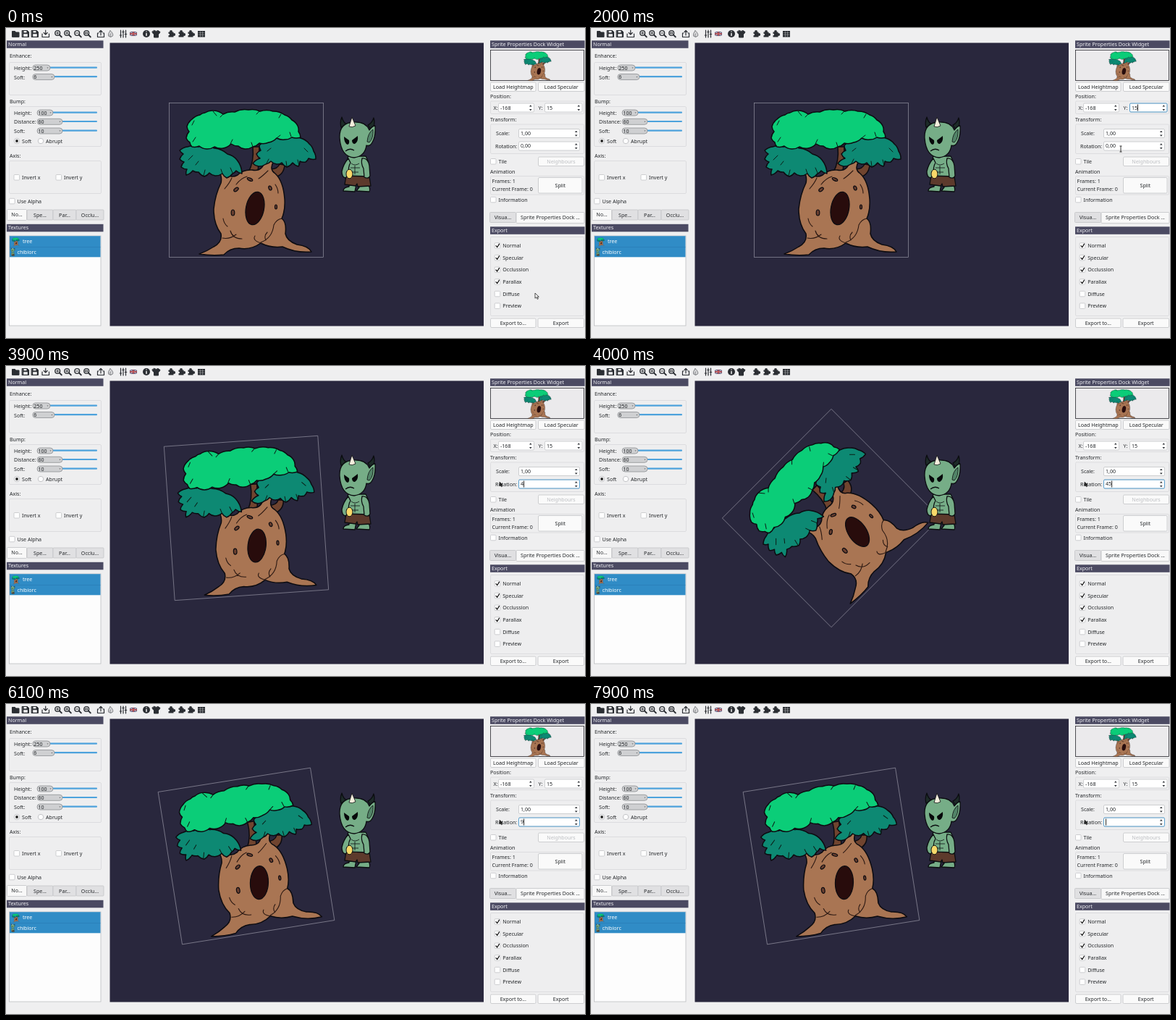
Animation of 800x428 px, one loop 8 s. Source, as an HTML page:

```html
<!DOCTYPE html>
<html lang="en">
<head>
<meta charset="utf-8">
<title>Sprite editor</title>
<style>
html, body { margin: 0; height: 100%; overflow: hidden; background: #efeff0; }
svg { display: block; width: 800px; height: 428px; }
text { font: 7.1px "Noto Sans", sans-serif; fill: #232629; white-space: pre; }
</style>
</head>
<body>
<svg id="stage" viewBox="0 0 800 428">
<defs>
  <g id="tree"></g>
  <g id="orc" stroke="#0b0d10" stroke-width="1.3" stroke-linejoin="round">
    <path fill="#1d2b28" d="M463 137Q461 130 464 123Q466 131 471 133ZM500 134Q506 131 508 124Q511 133 505 142Z"/>
    <path fill="#76ad87" d="M474 217L474 219Q466 220 466 225L482 226 484 216ZM488 216L488 220 484 225 502 226Q504 221 500 216Z"/>
    <path fill="#76ad87" d="M473 177Q470 184 472 206L501 206Q504 188 497 177Z"/>
    <path fill="#5d3a2c" d="M470 204L502 205 504 218 486 219 485 215 483 218 468 216Z"/>
    <path fill="#76ad87" d="M473 180Q466 188 464 198Q464 206 469 207L474 202Q472 192 476 186ZM492 180Q500 179 502 190L503 204Q501 209 495 206L494 194Q490 187 492 180Z"/>
    <path fill="none" stroke-width=".8" d="M477 187Q482 191 488 187M482 190L482 202M476 193L489 193M478 199L487 199"/>
    <path fill="#76ad87" d="M461 152Q460 131 480 130Q497 129 502 141Q506 135 510 135Q511 150 506 158Q503 164 498 162Q496 177 481 179Q463 178 461 152Z"/>
    <path fill="#528468" stroke-width=".8" d="M499 157Q500 145 507 140Q508 152 502 158Z"/>
    <path fill="#f4eedd" stroke-width=".8" d="M474 136L478 123 483 135Q478 138 474 136Z"/>
    <path fill="#06080a" stroke="none" d="M467 150L474 155Q475 160 472 161Q467 159 467 150ZM486 149L478 155Q478 160 482 160Q487 157 486 149Z"/>
    <path fill="none" d="M469 170Q475 165 481 169"/>
    <ellipse cx="474.5" cy="201.5" rx="4.5" ry="6.3" fill="#f8d869" stroke-width="1"/>
  </g>
</defs>
<g id="ui"></g>
<rect x="143.5" y="20.5" width="516.5" height="391" fill="#29273d"/>
<g id="spin">
  <rect x="225.5" y="103.5" width="213" height="213" fill="none" stroke="#9b9aa8" stroke-width=".65"/>
  <use href="#tree"/>
</g>
<use href="#orc"/>
<rect id="focus" width="0" height="12" rx="1.5" fill="none" stroke="#4a9bd0" stroke-width=".9"/>
<rect id="mark" y="157.5" height="11" fill="#308cc6"/>
<text id="angle" x="711" y="165.4"></text>
<path id="caret" stroke="#111" stroke-width=".9" d="M.5 -4.5V4.5"/>
<g id="mouse">
  <path d="M0 0V7.2L1.8 5.6 3.2 8.4 4.4 7.8 3.1 5.2H5.3Z" stroke="#222" stroke-width=".8"/>
  <path d="M-1.5-4H1.5M0-4V4M-1.5 4H1.5" fill="none" stroke="#222" stroke-width=".9"/>
</g>
</svg>
<script>
const $ = id => document.getElementById(id);
const INK = '#2b2e33', EDGE = '#c3c4c7', BLUE = '#308cc6';

const path = (d, fill = 'none', stroke = INK, w = 1) =>
  `<path d="${d}" fill="${fill}" stroke="${stroke}" stroke-width="${w}" stroke-linejoin="round" stroke-linecap="round"/>`;
const box = (x, y, w, h, fill, stroke = 'none', r = 0) =>
  `<rect x="${x}" y="${y}" width="${w}" height="${h}" rx="${r}" fill="${fill}" stroke="${stroke}" stroke-width=".8"/>`;
const label = (x, y, s, fill = '#232629', anchor = 'start') =>
  `<text x="${x}" y="${y}" text-anchor="${anchor}" style="fill:${fill}">${s}</text>`;
const bar = (x, y, w, s) => box(x, y, w, 10.5, '#4b4a62') + label(x + 2, y + 7.6, s, '#f0f0f4');
const group = (x, y, w, h) => box(x, y, w, h, '#eeeeef', '#d8d9db', 1.5);
const button = (x, y, w, h, s, fill = '#232629') =>
  box(x, y, w, h, '#fafafa', EDGE, 1.5) + label(x + w / 2, y + h / 2 + 2.5, s, fill, 'middle');
const check = (x, y, s, on) =>
  box(x, y, 7.5, 7.5, '#fff', EDGE, 1) + (on ? path(`M${x + 1.8} ${y + 4}l1.7 2 2.8-4.6`, 'none', '#111', 1.2) : '') +
  label(x + 11, y + 6.4, s);
const radio = (x, y, s, on) =>
  `<circle cx="${x}" cy="${y}" r="3.7" fill="#fff" stroke="${EDGE}"/>` +
  (on ? `<circle cx="${x}" cy="${y}" r="1.9" fill="#222"/>` : '') + label(x + 7, y + 2.6, s);
const field = (x, y, w, s) => box(x, y, w, 12, '#fff', EDGE, 1.5) +
  path(`M${x + w - 6.5} ${y + 4.5}l1.8-2.2 1.8 2.2zM${x + w - 6.5} ${y + 8}l1.8 2.2 1.8-2.2z`, INK, 'none') +
  label(x + 2.5, y + 8.5, s);
const slider = (y, name, x, end, s) => label(11, y + 3, name) +
  box(end - 2, y - 1.4, 128 - end, 2.2, '#4da2dc', 'none', 1) +
  box(x, y - 4, end - x, 8, '#cfd0d2', '#8f9194', 4) + label(x + 1.5, y + 2.5, s) +
  path(`M${end - 4.5} ${y - .5}l1 1.3 1-1.3z`, '#555', 'none');
const tab = (x, y, w, s, on) => box(x, y, w, on ? 15 : 14, on ? '#f8f8f8' : '#e0e0e2', EDGE, 1) +
  label(x + w / 2, y + 9.6, s, '#232629', 'middle');
const small = (id, x, y, k, cx, cy) =>
  `<use href="#${id}" transform="translate(${x} ${y}) scale(${k}) translate(${-cx} ${-cy})"/>`;

// Closed outline whose segments bulge outwards (points run clockwise).
function blob(pts, k, fill) {
  let d = `M${pts[0]} ${pts[1]}`;
  for (let i = 0; i < pts.length; i += 2) {
    const x = pts[i], y = pts[i + 1];
    const u = pts[(i + 2) % pts.length], v = pts[(i + 3) % pts.length];
    d += `Q${(x + u) / 2 + k * (v - y)} ${(y + v) / 2 - k * (u - x)} ${u} ${v}`;
  }
  return path(d + 'Z', fill, '#0c0b10', 1.5);
}

const knot = (x, y, rx, ry, a, fill = '#6b4030') =>
  `<ellipse cx="${x}" cy="${y}" rx="${rx}" ry="${ry}" transform="rotate(${a} ${x} ${y})" fill="${fill}" stroke="#0c0b10" stroke-width="1.2"/>`;

$('tree').innerHTML =
  path('M335 199Q343 184 341 164L350 164Q350 182 348 198ZM360 194Q374 197 378 188L385 189Q384 203 371 206Z', '#70442f', '#0c0b10', 1.5) +
  path(`M297 214Q299 205 294 198L304 198Q309 209 320 203Q328 195 340 196Q354 199 358 183L370 184Q363 195 372 201
    Q383 211 385 236Q386 252 381 263Q388 268 386 284Q388 294 402 299Q418 301 422 309Q401 311 382 302Q366 304 352 297
    Q338 307 322 304Q309 304 301 313Q285 315 267 312Q278 308 287 302Q299 296 297 284Q287 271 287 250Q289 230 297 214Z`,
    '#a97553', '#0c0b10', 1.5) +
  path(`M299 290Q309 292 318 285M310 280Q313 291 326 291M344 287Q340 293 352 297M352 296Q368 290 370 272Q374 264 381 263
    M361 282Q356 287 359 293M302 222Q309 214 312 207M362 197Q354 205 349 208M318 216Q325 207 333 205M372 216Q376 222 376 228M300 263Q301 270 306 274`,
    'none', '#2b1812', 1.1) +
  knot(344, 249, 12.5, 23, 11, '#280c0c') + knot(337, 209, 4, 1.8, 25) + knot(313.5, 255, 2.3, 4, 0) +
  knot(318, 223, 3.6, 2, -35) + knot(365, 221, 2, 3, -20) + knot(373, 247, 1.5, 3, 0) +
  blob([240,169, 251,164, 266,164, 288,166, 306,174, 319,182, 326,201, 318,197, 313,201, 305,207, 299,201,
    289,204, 281,200, 274,205, 266,199, 258,197, 249,203, 250,195, 242,192, 246,185, 240,181, 245,174], .17, '#0d8973') +
  blob([350,162, 370,152, 390,151, 407,152, 419,160, 425,170, 428,181, 418,180, 414,185, 406,184, 404,191, 396,186,
    388,192, 381,186, 374,188, 366,184, 359,188, 349,191, 341,187, 351,180, 346,174, 352,169], .17, '#0d8973') +
  blob([249,152, 253,143, 250,136, 257,126, 268,120, 275,117, 286,114, 300,119, 316,116, 335,113, 351,115, 369,115,
    385,120, 395,127, 403,135, 404,143, 407,151, 395,151, 385,154, 374,152, 363,158, 350,159, 341,164, 330,167, 321,163,
    311,160, 300,166, 288,164, 277,167, 267,163, 257,164, 254,158], .17, '#0bcd78') +
  path('M286 115l5 6M300 119l-4 4M351 114l-5 5M380 119l-3 5M262 151l-4 6M310 160l3-6M341 164l-2-6M374 152l5-4M394 150l-2-6M260 128l-3 6',
    'none', '#0b1c16', 1) +
  path('M258 176l-6 6M273 204l2-8M299 201l-2-6M313 200l-3-7M266 184l-4 5M360 187l3-6M388 191l-1-7M405 190l-2-8M366 166l-5 4M412 166l5 5',
    'none', '#0b1c16', 1);

function toolbar() {
  const lens = (x, mark) => path(`M${x + 1.8} 9.4l3 3`, 'none', INK, 2) +
    `<circle cx="${x - .8}" cy="7" r="3.4" fill="none" stroke="${INK}" stroke-width="1.4"/>` + path(mark, 'none', INK, .9);
  const disk = x => path(`M${x - 4.5} 3.5h7l2 2v7h-9z`, INK) + box(x - 2.5, 4, 4, 2.4, '#efeff0') + box(x - 2.8, 8.2, 5.6, 3.6, '#efeff0');
  const puzzle = x => box(x - 4.5, 5.5, 7, 7, INK) +
    `<circle cx="${x - 1}" cy="4.8" r="1.9" fill="${INK}"/><circle cx="${x + 3.2}" cy="9" r="1.9" fill="${INK}"/>` +
    `<circle cx="${x - 4.3}" cy="9" r="1.3" fill="#efeff0"/>`;
  return path('M8.5 12V4.5h4l1 1.5h4.5v6z', INK) + disk(27) + disk(40) +
    path('M50 8v4.5h9.5V8M54.7 3v6m-2.5-2.5l2.5 2.5 2.5-2.5', 'none', INK, 1.2) +
    lens(72, 'M69.5 7h3.5M71.2 5.3v3.5') + lens(85, 'M82.5 7h3.5M84.2 5.3v3.5') +
    lens(99, 'M96.5 7h3.5') + lens(112, 'M110 6h2.5v2H110z') +
    path('M128 7h-1.5v5.5h9V7H134M131 10V3.5m-2 2l2-2 2 2', 'none', INK, 1.2) +
    path('M144 3.5Q149 8 147.5 11Q144.5 14 141.5 11Q140.5 8 144 3.5M144.5 8Q142.5 10 144.5 12', '#d5d5d7', '#77797d', .9) +
    path('M158.5 3v10M162 3v10M165.5 3v10M157.3 10h2.4M160.8 5.5h2.4M164.3 8.5h2.4', 'none', INK, 1.2) +
    box(171, 5, 10, 6, '#57597f') + path('M171.5 5.5l9 5M180.5 5.5l-9 5', 'none', '#e6dada', 1) +
    path('M171.5 8h9M176 5.5v5', 'none', '#c24b4b', 1.3) +
    `<circle cx="194" cy="8" r="5" fill="${INK}"/>` + path('M194 7.5v3M194 5v.1', 'none', '#fff', 1.4) +
    path('M205 3.5Q207.5 5.5 210 3.5L213 5.5 211.5 8H210.5V13H204.5V8H203.5L202 5.5Z', INK) +
    puzzle(229) + puzzle(243) + puzzle(256) +
    box(265, 4, 10, 8.5, INK) + path('M266 6.7h8M266 9.4h8M268.5 5v7M271.5 5v7', 'none', '#b9babd', .5);
}

const outputs = ['Normal', 'Specular', 'Occlussion', 'Parallax', 'Diffuse', 'Preview'];

$('ui').innerHTML = toolbar() +
  bar(1, 17.3, 133.5, 'Normal') +
  label(5, 41, 'Enhance:') + group(4.5, 47.5, 127, 45) +
  slider(55, 'Height:', 36.8, 61, '250') + slider(67.5, 'Soft:', 36.8, 67, '6') +
  label(5, 103.5, 'Bump:') + group(4.5, 108.5, 127, 55) +
  slider(117, 'Height:', 43, 65, '100') + slider(129.3, 'Distance:', 43, 78, '60') + slider(142, 'Soft:', 43, 78, '10') +
  radio(15, 156, 'Soft', true) + radio(48, 156, 'Abrupt') +
  label(5, 178.5, 'Axis:') + group(4.5, 183.5, 127, 45) +
  check(11, 202.5, 'Invert x') + check(69, 202.5, 'Invert y') + check(4.5, 235.3, 'Use Alpha') +
  tab(1.5, 250.5, 27, 'No...', true) + tab(29, 251, 36, 'Spe...') + tab(65, 251, 32, 'Par...') + tab(97, 251, 38, 'Occlu...') +
  bar(1, 270.8, 133.5, 'Textures') + box(4.5, 287, 126.5, 124, '#fdfdfd', '#bcbdc0') +
  box(5, 287.2, 125.5, 29.1, BLUE) + box(5, 302, 125.5, .6, '#277bb2') +
  small('tree', 13.5, 295, .055, 332, 210) + small('orc', 9.5, 309.3, .11, 485, 175) +
  label(23, 297.3, 'tree', '#fff') + label(15.5, 311.6, 'chibiorc', '#fff') +
  bar(669, 17.3, 130.5, 'Sprite Properties Dock Widget') +
  box(669.5, 30.5, 129, 42, '#ebeaec', '#25252b') + small('tree', 734, 52, .2, 332, 210) +
  button(669.5, 75, 62.5, 12.5, 'Load Heightmap') + button(735.5, 75, 63.5, 12.5, 'Load Specular') +
  label(669, 97.3, 'Position:') + group(669.5, 101, 129, 17.5) +
  label(673.5, 112.5, 'X:') + field(680.5, 104, 49, '-168') + label(735.5, 112.5, 'Y:') + field(744.5, 104, 51.5, '15') +
  label(669, 128.7, 'Transform:') + group(669.5, 133, 129, 40.5) +
  label(677, 148, 'Scale:') + field(708.5, 139.5, 84, '1,00') + label(676, 165.5, 'Rotation:') + field(708.5, 157, 84, '') +
  check(669.5, 180.5, 'Tile') + button(735.5, 178, 63, 12.5, 'Neighbours', '#bcbec1') +
  label(669, 200.7, 'Animation') + group(669.5, 204.5, 129, 25.5) +
  label(671.5, 213.8, 'Frames: 1') + label(671.5, 225.3, 'Current Frame: 0') + button(735.5, 206.5, 60.5, 21.5, 'Split') +
  check(669.5, 233.3, 'Information') +
  tab(668.5, 254.5, 36, 'Visua...') + tab(705, 254.5, 94, 'Sprite Properties Dock ...', true) +
  bar(669, 274.3, 130.5, 'Export') + group(669.5, 288.5, 129, 109) +
  outputs.map((s, i) => check(675.2, 296.7 + i * 16.65, s, i < 4)).join('') +
  button(669.5, 401, 62.5, 12.5, 'Export to...') + button(735, 401, 63.5, 12.5, 'Export');

// Rotation field edits; clearing the field leaves the sprite as it was.
const edits = [[0, '0,00', 0], [3400, '', 0], [3800, '4', 4], [4000, '45', 45], [5100, '4', 4],
  [5400, '', 4], [5900, '9', 9], [7900, '', 9]];
const route = [[0, 731, 366], [600, 731, 366], [1500, 757, 109], [1600, 757, 109], [2000, 732, 167],
  [2400, 731, 163], [2900, 682, 160], [8000, 682, 160]];

function pointer(t) {
  const i = route.findIndex(p => p[0] > t), [a, x, y] = route[i - 1], [b, u, v] = route[i];
  const k = (t - a) / (b - a), e = k * k * (3 - 2 * k);
  return [x + (u - x) * e, y + (v - y) * e];
}

function draw() {
  const t = Math.floor(performance.now() % 8000 / 100) * 100;
  const [mx, my] = pointer(t);
  const editY = t >= 1600 && t < 2500, editAngle = t >= 2500;
  const [since, value, turn] = edits.filter(e => e[0] <= t).pop();

  $('spin').setAttribute('transform', `rotate(${-turn} 332 210)`);

  const angle = $('angle');
  angle.textContent = value;
  const end = 711 + (value && angle.getComputedTextLength());
  const selecting = editAngle && t < 3400;
  const from = Math.max(711, Math.min(mx, end));
  $('mark').setAttribute('x', from);
  $('mark').setAttribute('width', selecting ? end - from + .5 : 0);
  angle.style.fill = selecting && from < 714 ? '#fff' : '#232629';

  const focus = $('focus');
  focus.setAttribute('x', editY ? 744.5 : 708.5);
  focus.setAttribute('y', editY ? 104 : 157);
  focus.setAttribute('width', editY ? 51.5 : editAngle ? 84 : 0);

  // The caret blinks every half second, starting anew with each edit.
  const caret = $('caret'), lit = (t - since) % 1000 < 500;
  caret.style.display = editY || editAngle && !selecting && lit ? '' : 'none';
  caret.setAttribute('transform', editY ? 'translate(755 110)' : `translate(${end} 163)`);

  const inField = mx > 708 && mx < 794 && (my > 103 && my < 117 || my > 138 && my < 170);
  const [arrow, beam] = $('mouse').children;
  $('mouse').setAttribute('transform', `translate(${mx} ${my})${t >= 2800 ? ' scale(.8)' : ''}`);
  arrow.style.display = inField ? 'none' : '';
  arrow.style.fill = t >= 2800 ? '#222' : '#fff';
  beam.style.display = inField ? '' : 'none';
  requestAnimationFrame(draw);
}
draw();
</script>
</body>
</html>
```
